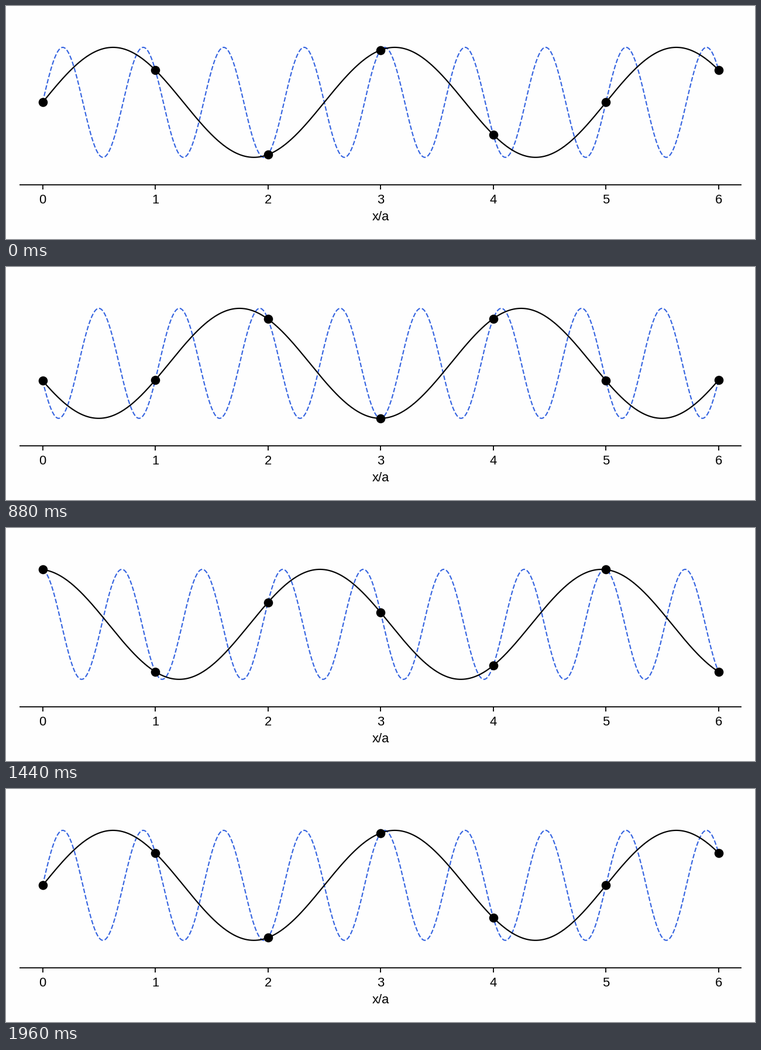
A matplotlib script that plays this animation: 1280 px wide and 400 px high, repeating every 2000 ms.

```python
import numpy as np
import matplotlib.pyplot as plt
from matplotlib.animation import FuncAnimation

W, H, DPI = 1280, 400, 100
FRAMES, INTERVAL = 50, 40
PX = 72 / DPI                      # points per pixel

X0, STEP = 62.6, 192.53            # pixel of x = 0, pixels per lattice spacing
MID, AMP = 165.4, 94.4
AXIS_Y = 307
K_SLOW, K_FAST = 0.8 * np.pi, 2.8 * np.pi

plt.rcParams["font.family"] = "Liberation Sans"
fig = plt.figure(figsize=(W / DPI, H / DPI), dpi=DPI, facecolor="#fefefe")
ax = fig.add_axes([0, 0, 1, 1])
ax.set_xlim(0, W)
ax.set_ylim(H, 0)
ax.axis("off")


def to_px(x):
    return X0 + STEP * x


def wave(k, x, phase):
    return MID - AMP * np.sin(k * x - phase)


def label(x, y, text):
    ax.text(x, y, text, fontsize=22 * PX, color="black", ha="center", va="baseline")


# Axis with ticks and labels
axis_style = dict(color="black", lw=1.8 * PX)
ax.plot([to_px(-0.2), to_px(6.2)], [AXIS_Y, AXIS_Y],
        solid_capstyle="projecting", **axis_style)
for i in range(7):
    ax.plot([to_px(i)] * 2, [AXIS_Y, AXIS_Y + 8], solid_capstyle="butt", **axis_style)
    label(to_px(i), 338.6, str(i))
label(to_px(3), 368.4, "x/a")

xs = np.linspace(0, 6, 1001)
sites = np.arange(7)
fast, = ax.plot([], [], color="#3463e0", lw=2.1 * PX, dashes=(3.7, 1.6),
                dash_capstyle="butt", zorder=3)
slow, = ax.plot([], [], color="black", lw=2.2 * PX, zorder=4)
atoms, = ax.plot([], [], "o", color="black", ms=15.6 * PX, mew=0, zorder=5)


def draw(i):
    # The last frame repeats the first pose
    phase = 2 * np.pi * i / (FRAMES - 1)
    fast.set_data(to_px(xs), wave(K_FAST, xs, phase))
    slow.set_data(to_px(xs), wave(K_SLOW, xs, phase))
    atoms.set_data(to_px(sites), wave(K_SLOW, sites, phase))
    return fast, slow, atoms


anim = FuncAnimation(fig, draw, frames=FRAMES, interval=INTERVAL,
                     init_func=lambda: draw(0), repeat=True, repeat_delay=0)
plt.show()
```
